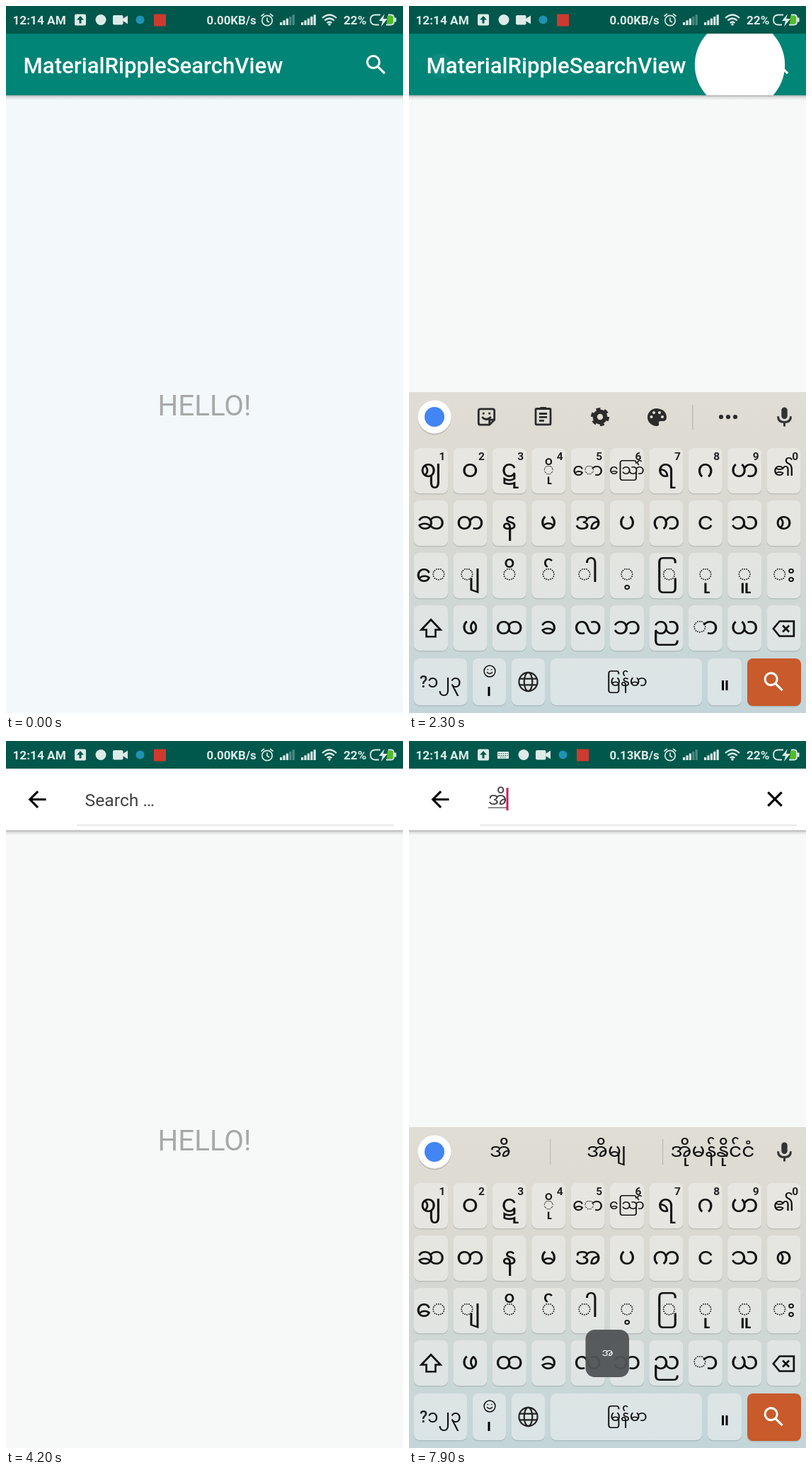
Recreate the animation shown at these times as an HTML page. Size 561 px wide and 998 px high, loop 8000 ms.

```html
<!DOCTYPE html>
<html lang="en">
<head>
<meta charset="utf-8">
<title>MaterialRippleSearchView</title>
<style>
html, body { margin: 0; width: 100%; height: 100%; overflow: hidden; background: #f7f9f8; }
svg { display: block; width: 100vw; height: 100vh; }
text { font-family: Roboto, sans-serif; white-space: pre; }
.burmese { font-family: "Noto Sans Myanmar", "Noto Sans", sans-serif; text-anchor: middle; fill: currentColor; }
.line { fill: none; stroke: currentColor; }
.mid { text-anchor: middle; }
</style>
</head>
<body>
<svg id="stage" viewBox="0 0 561 998"></svg>
<script>
const LOOP = 8000, STEP = 100;
const REVEAL = { x: 467.5, y: 83, r: 470, ms: 300 };
const NEVER = 1e6;

// [start, end] of each visible spell
const searchOpen = [[1178, 2072], [2816, 4660], [5616, NEVER]];
const keyboardUp = [[1480, 2310], [3180, 3900], [5980, NEVER]];
const noticeOn = [[1450, 2080], [3080, 3850], [5940, NEVER]];
const cursorOn = [[1178, 2072], [2816, 3320], [3820, 3900], [5616, 6120], [6620, 7120], [7200, NEVER]];
const lineOn = [[1178, 2072], [2816, 4660], [5616, NEVER]];

// [x, y, down, up]
const searchTaps = [[515, 75, 800, 1170], [518, 79, 2700, 2810], [517, 80, 5350, 5610]];
const backTaps = [[45, 84, 1850, 2080], [44, 85, 4500, 4650]];
const keyTaps = [[252, 731, 7080, 7180], [142, 803, 7540, 7620]];

const clamp = v => Math.max(0, Math.min(1, v));
const ramp = (t, start, ms) => clamp((t - start) / ms);
const ease = p => (1 - Math.cos(Math.PI * p)) / 2;
const spell = (list, t, ms, curve = p => p) =>
  list.reduce((sum, [a, b]) => sum + curve(ramp(t, a, ms)) - curve(ramp(t, b, ms)), 0);
const within = (list, t) => list.some(([a, b]) => t >= a && t < b);

const label = (str, x, y, size, attrs = '') =>
  `<text x="${x}" y="${y}" font-size="${size}" ${attrs}>${str}</text>`;
const burmese = (str, x, y, size) => label(str, x, y, size, 'class="burmese"');
const box = (x, y, w, h, attrs = '') => `<rect x="${x}" y="${y}" width="${w}" height="${h}" ${attrs}/>`;
const disc = (x, y, r, attrs = '') => `<circle cx="${x}" cy="${y}" r="${r}" ${attrs}/>`;

// 24-unit icons, centred
const icons = {
  search: `${disc(9.5, 9.5, 5.5)}<path d="M13.8 13.8l6 6"/>`,
  back: '<path d="M20 12H5.5M12.7 4.7L5.4 12l7.3 7.3"/>',
  clear: '<path d="M5.8 5.8l12.4 12.4M18.2 5.8L5.8 18.2"/>',
  shift: '<path d="M12 3.5L3 13h4.7v6.5h8.6V13H21z"/>',
  erase: '<path d="M8 5h13.5v14H8l-5.8-7zM11 9l6 6M17 9l-6 6"/>',
  globe: disc(12, 12, 9) + '<ellipse cx="12" cy="12" rx="4" ry="9"/><path d="M3.8 9h16.4M3.8 15h16.4"/>',
  smile: disc(12, 12, 9) + '<path d="M7.5 13.5q4.5 5 9 0M9 8.5v1.5M15 8.5v1.5"/>',
  sticker: '<path d="M6 4h12q2 0 2 2v9l-5 5H6q-2 0-2-2V6q0-2 2-2zM20 15h-5v5M7.5 12q4 5 9 0M8 8.5h2M14 8.5h2"/>',
  clipboard: box(4.5, 4.5, 15, 16, 'rx="1"') + '<path d="M9 3.8h6M8 9.5h8M8 13h8M8 16.5h5"/>',
  gear: disc(12, 12, 5.4, 'stroke-width="4.6"') + disc(12, 12, 8.4, 'stroke-width="2.6" stroke-dasharray="4.4"'),
  mic: box(10.2, 4, 3.6, 9, 'rx="1.8" fill="currentColor"') + '<path d="M6 11.5q0 5.5 6 5.5t6-5.5M12 17v4"/>'
};
const icon = (name, x, y, scale = 1.558, width = 2, color = 'currentColor') =>
  `<g class="line" style="color:${color}" stroke-width="${width}"
    transform="translate(${x - 12 * scale} ${y - 12 * scale}) scale(${scale})">${icons[name]}</g>`;

function statusBar() {
  const bars = (x, lit) => [0, 1, 2, 3, 4].map(i =>
    box(x + i * 4.4, 23 - i * 2.7, 3.2, 4 + i * 2.7, `opacity="${i < lit ? 1 : 0.35}"`)).join('');
  const bold = 'font-weight="700"';
  return box(0, 0, 561, 39, 'fill="#00574b"') + `<g fill="#dcebe8" color="#dcebe8">
    ${label('12:14 AM', 9.5, 26, 17.2, bold)}
    ${box(97, 11.5, 16, 16, 'rx="2"')}
    <path d="M105 14l5 5.5h-3.5v5h-3v-5H100z" fill="#00574b"/>
    <g id="keyNotice">${box(-8, -4.5, 16, 10, 'rx="1"')}
      <path class="line" style="color:#00574b" stroke-dasharray="1.5 1.5" d="M-6.5-1.8h13M-6.5 1h13M-4 3.5h8"/></g>
    <g id="notices">${disc(134, 19.5, 7.5)}
      ${box(151, 13, 14.5, 13.5, 'rx="2"')}<path d="M165 18l7-4.5v12l-7-4.5z"/>
      ${disc(189.5, 19.5, 6, 'fill="#1f93b4"')}${box(209, 11.5, 17, 17, 'fill="#cf3a30"')}</g>
    <text id="speed" x="283.5" y="26" font-size="16.8" ${bold}></text>
    <g class="line" stroke-width="1.7">${disc(369, 20.5, 7.2)}
      <path d="M369 16.5v4.5l3 2M360.5 14.5l4.500-3.7M377.5 14.5l-4.5-3.7"/></g>
    ${bars(387, 3)}${bars(417, 5)}
    <g class="line" stroke-width="2.3"><path d="M447 17q10-9 20 0M450.3 20.5q6.7-6 13.4 0M453.6 24q3.4-3 6.8 0"/></g>
    ${disc(457, 26, 1.8)}
    ${label('22%', 477, 26, 17.2, bold)}
    <path d="M539 13.5h5q3.5 0 3.5 3.5v5q0 3.5-3.5 3.5h-6z" fill="#52bd25"/>
    <path class="line" stroke-width="1.8" d="M529 12.5h-7q-7 0-7 7t7 7h5M540 12.5h4q4 0 4 4v6q0 4-4 4h-7"/>
    ${box(549, 16.5, 2.5, 6)}<path d="M535 11l-8 10h5l-2 8 9-11h-6z"/></g>`;
}

function keyboard() {
  const rows = [
    'ဈ ဝ ဋ ◌ို ◌ော သြော် ရ ဂ ဟ ၏', 'ဆ တ န မ အ ပ က င သ စ',
    '◌ေ ◌ျ ◌ိ ◌် ◌ါ ◌့ ◌ြ ◌ု ◌ူ ◌း', 'shift ဖ ထ ခ လ ဘ ည ◌ာ ယ erase'
  ];
  const small = { '◌ို': 26, '◌ော': 26, 'သြော်': 20.5, '၏': 26 };
  const key = (x, y, w, h, fill = 'url(#keys)') =>
    box(x, y + 1.5, w, h, 'rx="8" fill="#6a7474" opacity=".25"') + box(x, y, w, h, `rx="8" fill="${fill}"`);
  const grid = rows.map((row, j) => row.split(' ').map((ch, i) => {
    const x = 7 + i * 55.4, y = 624 + j * 74;
    const size = small[ch] || 35;
    const face = icons[ch] ? icon(ch, x + 24, y + 33, 1.5, 1.8) : burmese(ch, x + 24, y + 31.5 + size * 0.28, size);
    const digit = j ? '' : label((i + 1) % 10, x + 40, 641, 15.5, 'class="mid" font-weight="700" fill="#222"');
    return key(x, y, 48, 64) + face + digit;
  }).join('')).join('');
  const bottom = [[7, 75], [90, 47], [145, 47], [200, 214], [422, 48]].map(([x, w]) => key(x, 921, w, 66)).join('') +
    key(478, 921, 76, 67, '#c85a2b');
  const palette = '<path fill="currentColor" d="M350 568a13 12.5 0 1 0 0 25q4 0 3-4-1-3 3-3h3q5 0 5-6-1-11-14-12z"/>' +
    [[342.5, 580], [346, 574], [354, 574], [358, 580]].map(([x, y]) => disc(x, y, 2.1, 'fill="#dfdcd3"')).join('');
  return `<g color="#111">${box(0, 545, 561, 453, 'fill="url(#board)"')}
    ${disc(36, 582, 23.5, 'fill="#000" opacity=".14"')}${disc(36, 580, 23.5, 'fill="#fff"')}
    ${disc(36, 580, 14, 'fill="#4285f4"')}
    <g id="tools" color="#2b2b2b">${icon('sticker', 109.5, 580, 1.4)}${icon('clipboard', 189.5, 579, 1.4)}
      ${icon('gear', 270, 580, 1.35)}${palette}${box(400, 563, 1.5, 35, 'fill="#bdbbb4"')}
      ${[441, 451, 461].map(x => disc(x, 580, 3.1, 'fill="currentColor"')).join('')}</g>
    <g id="words"><g id="word1">${burmese('အ', 129, 587, 28)}</g><g id="word2">${burmese('အိ', 129, 587, 28)}</g>
      ${burmese('အိမျ', 279, 587, 28)}${burmese('အိုမန်နိုင်ငံ', 429, 587, 28)}
      ${box(199, 562, 1.2, 36, 'fill="#bdbbb4"')}${box(358, 562, 1.2, 36, 'fill="#bdbbb4"')}</g>
    ${icon('mic', 530.5, 580, 1.5, 2, '#333')}${grid}${bottom}
    ${label('?', 15, 962, 23, 'font-weight="500" fill="#222"')}${burmese('၁၂၃', 50, 962, 25)}
    ${icon('smile', 114, 939, 0.88, 1.7)}${box(111.5, 961, 3, 13)}
    ${icon('globe', 168.5, 954, 1.45, 1.5, '#222')}${burmese('မြန်မာ', 308, 960, 22)}
    ${box(442, 952, 3, 14)}${box(447.5, 952, 3, 14)}${icon('search', 515.5, 954, 1.55, 2, '#fff')}</g>`;
}

const stage = document.getElementById('stage');
stage.innerHTML = `<defs>
  <linearGradient id="board" x2="0" y2="1"><stop stop-color="#e0ddd4"/><stop offset=".4" stop-color="#d9d8d1"/>
    <stop offset=".75" stop-color="#cbd7d6"/><stop offset="1" stop-color="#c3d5d9"/></linearGradient>
  <linearGradient id="keys" gradientUnits="userSpaceOnUse" x1="0" y1="624" x2="0" y2="988">
    <stop stop-color="#e8e6e0"/><stop offset=".4" stop-color="#e4e5e1"/><stop offset="1" stop-color="#dae4e6"/></linearGradient>
  <linearGradient id="shade" x2="0" y2="1"><stop stop-color="#000" stop-opacity=".3"/>
    <stop offset=".4" stop-color="#000" stop-opacity=".1"/><stop offset="1" stop-color="#000" stop-opacity="0"/></linearGradient>
  <clipPath id="reveal">${disc(REVEAL.x, REVEAL.y, 0, 'id="hole"')}</clipPath></defs>
  <rect id="page" width="561" height="998"/>
  ${label('HELLO!', 280.5, 578, 40.3, 'class="mid" fill="#a7a9a8"')}
  ${box(0, 126, 561, 7, 'fill="url(#shade)"')}
  ${box(0, 39, 561, 87, 'fill="#008577"')}
  ${label('MaterialRippleSearchView', 24.6, 95, 31.15, 'font-weight="500" fill="#fff"')}
  ${disc(523.5, 83, 31, 'id="searchRipple" fill="#fff"')}
  ${icon('search', 523, 83, 1.558, 2, '#fff')}
  <g clip-path="url(#reveal)">${box(0, 39, 561, 87, 'fill="#fefffe"')}
    ${disc(44, 83, 31, 'id="backRipple" fill="#000"')}
    ${icon('back', 44, 82.5, 1.558, 2, '#000')}
    ${box(100, 118, 448, 1.6, 'id="underline" fill="#e0e2e1"')}
    ${label('Search …', 111.6, 91.5, 24.7, 'id="hint" fill="#404040"')}
    <g color="#444"><g id="typed1">${burmese('အ', 125, 90, 25)}</g><g id="typed2">${burmese('အိ', 125, 90, 25)}</g></g>
    <g id="entry">${box(112, 93.5, 26, 1.3, 'fill="#555"')}${icon('clear', 517, 82, 1.558, 2, '#000')}</g>
    <rect id="cursor" y="66" width="3" height="32" fill="#d81b60"/></g>
  <g id="keyboard">${keyboard()}</g>
  <g id="toast">${box(249.5, 831, 61.5, 67, 'rx="13" fill="#515456" fill-opacity=".95"')}
    <g color="#fff">${burmese('အ', 280.5, 868, 15)}</g></g>
  ${statusBar()}
  <g id="touch" fill="#fff">${disc(0, 0, 18, 'opacity=".35"')}${disc(0, 0, 16.5, 'opacity=".8"')}</g>`;

const part = {};
stage.querySelectorAll('[id]').forEach(el => part[el.id] = el);
const set = (id, attrs) => Object.entries(attrs).forEach(([name, value]) => part[id].setAttribute(name, value));
const show = (id, on) => set(id, { opacity: +on });

function ripple(id, taps, t, strength) {
  const tap = taps.find(([, , down, up]) => t >= down && t < up + 200);
  set(id, tap
    ? { r: 31 * Math.sqrt(ramp(t, tap[2] - 60, 250)), opacity: strength * (1 - ramp(t, tap[3], 200)) }
    : { opacity: 0 });
}

function draw(t) {
  set('page', { fill: t < 500 ? '#f3f8fb' : '#f7f9f8' });
  set('hole', { r: REVEAL.r * spell(searchOpen, t, REVEAL.ms, ease) });
  ripple('searchRipple', searchTaps, t, 0.23);
  ripple('backRipple', backTaps, t, 0.12);

  const up = spell(keyboardUp, t, 180);
  set('keyboard', { opacity: up, transform: `translate(0 ${110 * (1 - up) ** 2})` });
  const notice = spell(noticeOn, t, 220);
  set('notices', { transform: `translate(${28 * notice})` });
  set('keyNotice', { transform: `translate(133 19.5) scale(${notice})`, opacity: notice });
  part.speed.textContent = t < 5000 ? '0.00KB/s' : '0.13KB/s';

  const typed = t >= 7680 ? 2 : t >= 7200 ? 1 : 0;
  show('hint', !typed);
  show('entry', typed);
  show('typed1', typed === 1);
  show('typed2', typed === 2);
  show('tools', t < 7300);
  show('words', t >= 7300);
  show('word1', typed === 1);
  show('word2', typed === 2);
  show('underline', within(lineOn, t));
  set('cursor', { x: typed ? 137.5 : 112, opacity: +within(cursorOn, t) });
  set('toast', { opacity: ramp(t, 7400, 250) });

  const tap = [...searchTaps, ...backTaps, ...keyTaps].find(([, , down, lift]) => t >= down && t < lift + 250);
  set('touch', tap
    ? { transform: `translate(${tap[0]} ${tap[1]})`, opacity: 0.55 * (1 - ramp(t, tap[3], 250)) }
    : { opacity: 0 });
}

const began = performance.now();
function tick() {
  const t = (performance.now() - began) % LOOP;
  draw(Math.floor(t / STEP) * STEP);
  requestAnimationFrame(tick);
}
tick();
</script>
</body>
</html>
```
